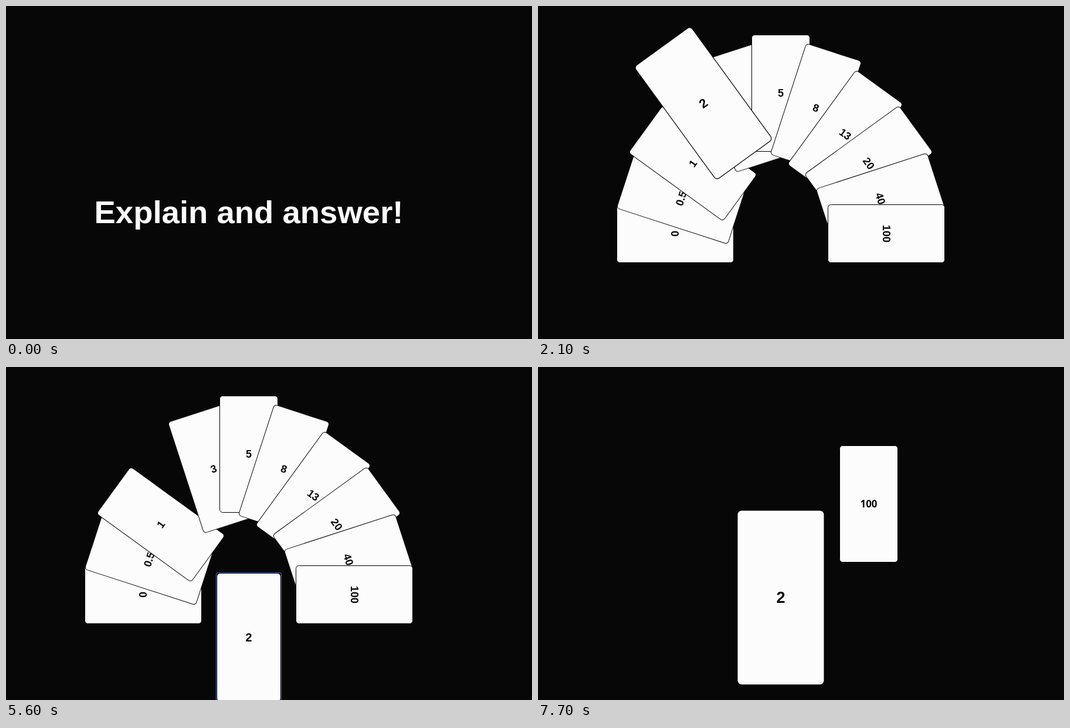
Recreate the animation shown at these times as an HTML page. Size 897 by 569 pixels, loop 8000 ms.

```html
<!DOCTYPE html>
<html lang="en">
<head>
<meta charset="utf-8">
<title>Estimation cards</title>
<style>
  html, body { margin: 0; width: 100%; height: 100%; overflow: hidden; background: #070707; }
  svg { display: block; width: 897px; height: 569px; }
  text { font-family: "Liberation Sans", Arial, sans-serif; font-weight: bold; text-anchor: middle; }
  #title { font-size: 54.5px; fill: #fcfcfc; }
  .card { fill: #fcfcfc; stroke: #000; }
  .label { font-size: 18px; fill: #070707; }
  .settled .label { font: bold 17px "Noto Sans", sans-serif; }
  .ring { fill: none; stroke: #4463b8; visibility: hidden; }
  .focus .ring { visibility: visible; }
</style>
</head>
<body>
<svg viewBox="0 0 897 569">
  <text id="title" x="414" y="371">Explain and answer!</text>
  <g id="deck"></g>
</svg>
<script>
const LOOP = 8000;
const ORIGIN = { x: 414, y: 484 };
const LABELS = ['0', '0.5', '1', '2', '3', '5', '8', '13', '20', '40', '100'];
const FAN_X = [0, 60, 110, 150, 170, 180];
const FAN_Y = [-335, -310, -265, -215, -155, -95];
const ONE = 2, PICK = 3, THREE = 4, LAST = 10;
const HOVER_MS = 250, MOVE_MS = 300;
const PICK_HOVER = 1665, CLICK = 4534, COLLECT = 7268;
const BUMPS = [
  { card: ONE, enter: 1605, leave: 1665 },
  { card: ONE, enter: 4700, leave: 4760 },
  { card: THREE, enter: 4880, leave: 4930 }
];
const PILE = { s: 1, x: 150, y: -250, r: 0 };
const CHOSEN = { s: 1.1, x: 0, y: -20, r: 0 };
const REVEALED = { s: 1.5, x: 0, y: -60, r: 0 };

const title = document.getElementById('title');
const deck = document.getElementById('deck');

function make(tag, attrs, parent) {
  const node = document.createElementNS('http://www.w3.org/2000/svg', tag);
  for (const key in attrs) node.setAttribute(key, attrs[key]);
  return parent.appendChild(node);
}

const cards = LABELS.map((label, i) => {
  const k = i - 5, n = Math.abs(k);
  const node = make('g', {}, deck);
  make('rect', { class: 'card', x: -49.5, y: -99.5, width: 99, height: 199, rx: 5 }, node);
  make('rect', { class: 'ring', x: -50.5, y: -100.5, width: 101, height: 201, rx: 3 }, node);
  make('text', { class: 'label', y: 6.3 }, node).textContent = label;
  return { node, home: { s: 1, x: Math.sign(k) * FAN_X[n], y: FAN_Y[n], r: 18 * k } };
});

const bezier = (u, a, b) => 3 * u * (1 - u) * ((1 - u) * a + u * b) + u ** 3;

// The CSS "ease" curve, solved by bisection.
function ease(t) {
  if (t <= 0) return 0;
  if (t >= 1) return 1;
  let lo = 0, hi = 1;
  for (let i = 0; i < 24; i++) {
    const mid = (lo + hi) / 2;
    if (bezier(mid, 0.25, 0.25) < t) lo = mid; else hi = mid;
  }
  return bezier(lo, 0.1, 1);
}

function mix(a, b, p) {
  const pose = {};
  for (const key in a) pose[key] = a[key] + (b[key] - a[key]) * p;
  return pose;
}

const hovered = pose => ({ ...pose, s: 1.2 });

// Pointer passing over a card: it starts to grow, then falls back.
function bumpAmount(bump, t) {
  const rise = ease((Math.min(t, bump.leave) - bump.enter) / HOVER_MS);
  return rise * (1 - ease((t - bump.leave) / HOVER_MS));
}

function poseOf(i, t) {
  const home = cards[i].home;
  const collect = ease((t - COLLECT) / MOVE_MS);
  if (i === PICK) {
    if (t >= COLLECT) return mix(CHOSEN, REVEALED, collect);
    const lifted = mix(home, hovered(home), ease((t - PICK_HOVER) / HOVER_MS));
    return mix(lifted, CHOSEN, ease((t - CLICK) / MOVE_MS));
  }
  let lift = 0;
  for (const bump of BUMPS) if (bump.card === i) lift = Math.max(lift, bumpAmount(bump, t));
  return mix(mix(home, hovered(home), lift), PILE, collect);
}

function topCard(t) {
  const bump = BUMPS.find(b => t >= b.enter && t < b.leave);
  if (bump) return bump.card;
  return t >= PICK_HOVER ? PICK : -1;
}

let raised = -1;
function raise(top) {
  if (top === raised) return;
  cards.forEach(card => deck.appendChild(card.node));
  if (top >= 0) deck.appendChild(cards[top].node);
  raised = top;
}

function draw(t) {
  const intro = t < 500;
  title.style.display = intro ? '' : 'none';
  deck.style.display = intro ? 'none' : '';
  raise(topCard(t));
  cards.forEach(({ node }, i) => {
    const { s, x, y, r } = poseOf(i, t);
    node.setAttribute('transform',
      `translate(${ORIGIN.x + s * x} ${ORIGIN.y + s * y}) rotate(${r}) scale(${s})`);
  });
  cards[PICK].node.classList.toggle('focus', t >= CLICK && t < COLLECT);
  cards[LAST].node.classList.toggle('settled', t >= COLLECT + MOVE_MS);
}

const start = performance.now();
function tick() {
  draw((performance.now() - start) % LOOP);
  requestAnimationFrame(tick);
}
tick();
</script>
</body>
</html>
```
